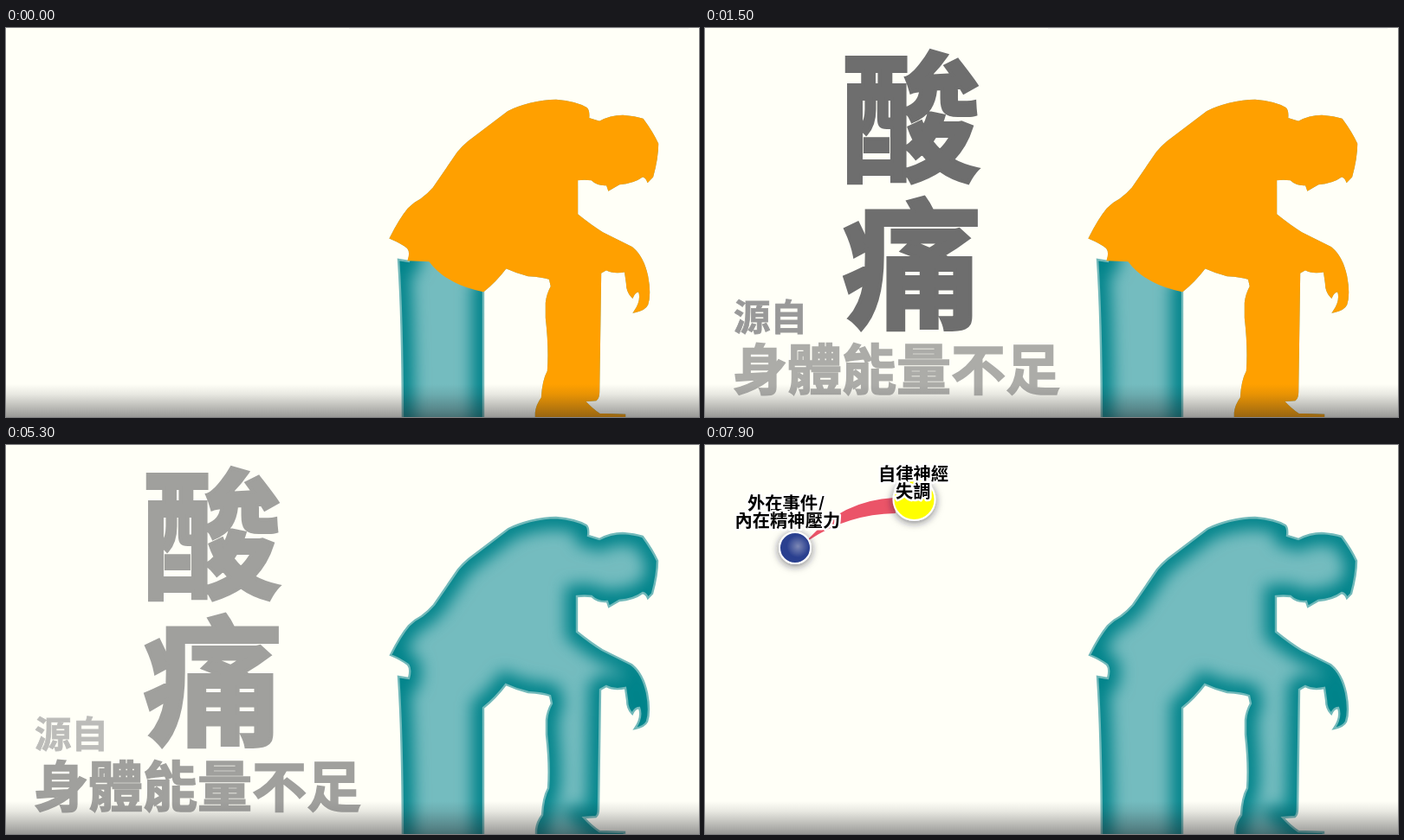
Animation of 800 by 450 pixels, one loop 8000 ms. Source, as an HTML page:

```html
<!DOCTYPE html>
<html lang="zh-Hant">
<head>
<meta charset="utf-8">
<title>酸痛</title>
<style>
  html, body { margin: 0; height: 100%; overflow: hidden; background: #fffff7; }
  svg { display: block; width: 100vw; height: 100vh; }
  text { font-family: "Noto Sans CJK TC", "Noto Sans CJK JP", "Noto Sans CJK", sans-serif; font-weight: 900; }
  .dark { fill: #6e6e6e; stroke: #6e6e6e; }
  .pale { fill: #999; stroke: #999; }
  .big { font-size: 161px; text-anchor: middle; stroke-width: 4px; }
  .label text {
    font-size: 20.3px; font-weight: 700; fill: #000;
    stroke: #fff; stroke-width: 5px; stroke-linejoin: round; paint-order: stroke;
  }
</style>
</head>
<body>
<svg viewBox="0 0 800 450">
  <defs>
    <linearGradient id="floor" x1="0" y1="0" x2="0" y2="1">
      <stop offset="0" stop-color="#222226" stop-opacity="0"/>
      <stop offset=".3" stop-color="#222226" stop-opacity=".1"/>
      <stop offset="1" stop-color="#222226" stop-opacity=".46"/>
    </linearGradient>
    <radialGradient id="shine" cx=".59" cy=".45" r=".36">
      <stop offset="0" stop-color="#7d88b5"/>
      <stop offset="1" stop-color="#293f8f"/>
    </radialGradient>
    <filter id="soft" filterUnits="userSpaceOnUse" x="400" y="40" width="400" height="460">
      <feGaussianBlur stdDeviation="9"/>
    </filter>
    <filter id="drop" x="-60%" y="-60%" width="220%" height="220%">
      <feDropShadow dx="0" dy="2" stdDeviation="5" flood-color="#223" flood-opacity=".6"/>
    </filter>
    <clipPath id="inside"><path class="seated"/></clipPath>
    <clipPath id="wipe"><rect id="wipeBox" x="117" y="50" width="0" height="65"/></clipPath>
  </defs>

  <rect width="800" height="450" fill="#fffff7"/>

  <g clip-path="url(#inside)">
    <path class="seated" fill="#74bcbf"/>
    <path class="seated" fill="none" stroke="#00838a" stroke-width="27" filter="url(#soft)"/>
  </g>
  <path class="seated" fill="none" stroke="#72b9ba" stroke-width="2.4"/>

  <g id="orange">
    <rect x="396" width="392" height="1" fill="#f2f2ef"/>
    <path id="man" fill="#ffa000" stroke="#ffa000" stroke-width="2.4"/>
  </g>
  <rect y="412" width="800" height="38" fill="url(#floor)"/>

  <g id="title" class="dark">
    <text class="big" x="237.5" y="165">酸</text>
    <text class="big" x="239" y="335">痛</text>
  </g>
  <text id="from" class="pale" x="33" y="350" font-size="42.5" stroke-width=".8">源自</text>
  <text id="line" class="dark" x="32" y="418" font-size="63" stroke-width="1.6">身體能量不足</text>

  <g id="effect">
    <path d="M119 109Q160 64 218 61L220 79Q165 80 120 110Z" fill="#eb5468" clip-path="url(#wipe)"/>
  </g>
  <g id="cause" class="label">
    <circle cx="104" cy="119" r="18" fill="url(#shine)" stroke="#fff" stroke-width="2" filter="url(#drop)"/>
    <text x="49" y="75">外在事件/</text>
    <text x="34.5" y="95">內在精神壓力</text>
  </g>
  <g id="result" class="label">
    <circle cx="241.5" cy="63" r="24" fill="#ff0" stroke="#fff" stroke-width="2" filter="url(#drop)"/>
    <text x="200" y="41">自律神經</text>
    <text x="220" y="61">失調</text>
  </g>
</svg>
<script>
const $ = id => document.getElementById(id);

// Outline shared by the man alone and the man with his stool
const upper = 'M444 243Q455 221 465 209Q472 202 480 198Q488 192 494 185L522 144Q527 138 534 132' +
  'L580 97Q590 92 605 88Q622 84 635 84Q658 86 670 93Q673 96 672 105L685 109Q698 102 712 102' +
  'Q726 103 735 106Q746 121 752 134Q752 150 746 172L741 177Q739 172 735 171Q724 179 708 180' +
  'L696 187L694 181Q683 182 676 175Q668 174 659 175V216Q675 229 688 237L722 254' +
  'Q735 264 740 287Q744 308 740 320Q737 326 726 328Q735 315 731 304Q726 304 723 311' +
  'Q717 305 717 295L715 281Q702 284 693 279L686 283Q685 350 684 421Q684 428 681 430L667 431' +
  'Q676 441 685 447L714 448V475H612V445Q613 436 619 428Q620 408 626 397Q628 370 624 335V318' +
  'Q625 308 630 299L628 290Q620 287 603 286Q590 283 577 277';
const back = 'Q468 259 464 254Q456 248 444 243Z';
$('man').setAttribute('d', upper + 'Q565 293 551 304Q531 300 518 293Q500 284 489 269L465 268' + back);
for (const p of document.querySelectorAll('.seated'))
  p.setAttribute('d', upper + 'Q565 293 551 304V475H458Q458 340 453 268L465 270' + back);

const tail = [[5200, 1], [5300, .65], [5700, 0]];
const tracks = {
  title: [[500, 0], [1300, 1], ...tail],
  from: [[700, 0], [1000, .38], [1300, 1], ...tail],
  line: [[700, 0], [1000, .26], [1300, .53], [1400, .53], [1500, .57], [2500, .57], [3300, 1], ...tail],
  orange: [[2500, 1], [3300, 0]],
  cause: [[6100, 0], [6600, 1]],
  result: [[7500, 0], [7900, 1]],
  effect: [[7500, 0], [7600, .5], [7900, 1]]
};
const slide = [[500, -320], [1300, 0]];
const wipe = [[7500, 0], [7900, 104]];

function at(keys, t) {
  if (t <= keys[0][0]) return keys[0][1];
  for (let i = 1; i < keys.length; i++) {
    const [t0, a] = keys[i - 1], [t1, b] = keys[i];
    if (t <= t1) return a + (b - a) * (t - t0) / (t1 - t0);
  }
  return keys[keys.length - 1][1];
}

function draw() {
  // The picture advances ten times a second
  const t = Math.floor(performance.now() % 8000 / 100) * 100;
  for (const id in tracks) $(id).setAttribute('opacity', at(tracks[id], t));
  $('title').setAttribute('transform', `translate(0 ${at(slide, t)})`);
  $('wipeBox').setAttribute('width', at(wipe, t));
  requestAnimationFrame(draw);
}
draw();
</script>
</body>
</html>
```
